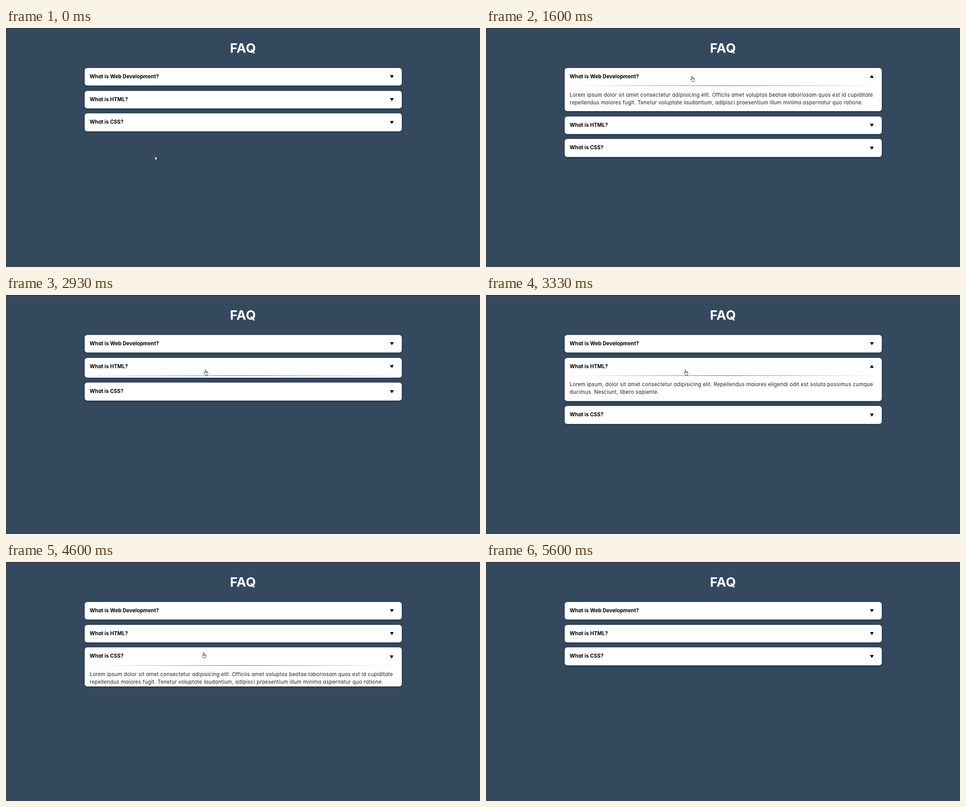
Write an HTML page that moves like this. It is 1054 px wide and 532 px high and loops after 6.34 s.

```html
<!DOCTYPE html>
<html lang="en">
<head>
<meta charset="utf-8">
<title>FAQ</title>
<style>
html, body { margin: 0; width: 100%; height: 100%; overflow: hidden; }
body {
  position: relative;
  background: #34495e;
  font: 400 11.28px/17px Inter, "Open Sans", sans-serif;
  font-feature-settings: "cv11";
  color: #1c1c1c;
}
body::before {
  content: "";
  position: absolute;
  inset: 0 0 auto;
  height: 1px;
  background: #1e2832;
}
h1 {
  position: absolute;
  top: 24.5px;
  left: 0;
  width: 1054px;
  margin: 0;
  font-size: 28.8px;
  font-weight: 700;
  line-height: 40px;
  letter-spacing: .4px;
  text-align: center;
  color: #fff;
}
.list { position: absolute; left: 175px; top: 88.8px; width: 705px; }
.item {
  position: relative;
  height: 39.5px;
  margin-bottom: 11.3px;
  overflow: hidden;
  border-radius: 5.6px;
  background: #fff;
  box-shadow: 0 1.4px 4px rgba(0, 0, 0, .3);
}
h2 {
  margin: 0;
  padding-left: 11px;
  font-size: 11.28px;
  font-weight: 700;
  line-height: 39.5px;
  letter-spacing: .1px;
  color: #000;
}
.mark { position: absolute; left: 677.4px; top: 13.6px; width: 12px; height: 12px; }
p {
  position: relative;
  margin: 0;
  padding: 12.4px 11px;
  letter-spacing: .33px;
  white-space: nowrap;
}
p::before {
  content: "";
  position: absolute;
  inset: 0 0 auto;
  height: 1px;
  background: linear-gradient(90deg, transparent, #34495e, transparent);
  opacity: .85;
}
#cursor { position: absolute; left: 0; top: 0; width: 16px; height: 18px; overflow: visible; }
#cursor path { fill: #fff; stroke: #111; stroke-width: .8; stroke-linejoin: round; }
</style>
</head>
<body>
<h1>FAQ</h1>
<div class="list"></div>
<svg id="cursor">
  <path id="arrow" d="M0 0V9.2L2.1 7.3 3.5 10.4 5 9.8 3.6 6.7H6.5Z"/>
  <path id="hand" d="M-.9 7.6V.9a.9.9 0 0 1 1.8 0V4.6q.9-.8 1.6.1 .9-.6 1.5.3 1.1-.3 1.3.8V8.6q0 2-1 3.6H.3Q-.5 10.6-3 8-3.7 6.8-2.9 6.5-1.9 6.3-.9 7.6ZM.9 4.6V6.6M2.5 4.8V6.6M4 5.1V6.6"/>
</svg>
<script>
const LOOP = 6340, STEP = 1000 / 15;
const HEAD = 39.5, BODY = 57, GAP = 11.3, TOP = 88.8;
const SLIDE = 300, SPIN = 400;

const long = "Lorem ipsum dolor sit amet consectetur adipisicing elit. Officiis amet voluptas beatae laboriosam quos est id cupiditate<br>" +
  "repellendus maiores fugit. Tenetur voluptate laudantium, adipisci praesentium illum minima aspernatur quo ratione.";
const short = "Lorem ipsum, dolor sit amet consectetur adipisicing elit. Repellendus maiores eligendi odit est soluta possimus cumque<br>" +
  "ducimus. Nesciunt, libero sapiente.";

const items = [
  { title: "What is Web Development?", text: long, open: 1263, close: 2138 },
  { title: "What is HTML?", text: short, open: 2905, close: 3601, spinBack: 300 },
  { title: "What is CSS?", text: long, open: 4440, close: 5162 }
];

// Pointer stops: time, x, y
const stops = [
  [267, 331, 285], [930, 457, 96.4], [1130, 458, 107.4],
  [2200, 458, 107.4], [2333, 458, 110.4], [2600, 443.5, 166.4],
  [3667, 443.5, 166.4], [3867, 442, 171.4], [4200, 440, 197.4],
  [4467, 440, 197.4], [4733, 439, 205.4], [5200, 439, 205.4], [5600, 5, 486]
];

const clamp = v => Math.min(1, Math.max(0, v));
const smooth = v => v * v * (3 - 2 * v);
const bez = (a, b, s) => 3 * a * s * (1 - s) ** 2 + 3 * b * s * s * (1 - s) + s ** 3;

// CSS "ease"
function ease(v) {
  if (v <= 0 || v >= 1) return clamp(v);
  let lo = 0, hi = 1;
  for (let i = 0; i < 24; i++) {
    const mid = (lo + hi) / 2;
    if (bez(.25, .25, mid) < v) lo = mid; else hi = mid;
  }
  return bez(.1, 1, lo);
}

const openness = (it, t, inTime, outTime) =>
  ease((t - it.open) / inTime) - ease((t - it.close) / outTime);

function pointer(t) {
  const i = stops.findIndex(s => s[0] > t);
  if (i < 0) return null;
  if (i === 0) return stops[0].slice(1);
  const [t0, x0, y0] = stops[i - 1], [t1, x1, y1] = stops[i];
  const k = smooth((t - t0) / (t1 - t0));
  return [x0 + (x1 - x0) * k, y0 + (y1 - y0) * k];
}

const list = document.querySelector(".list");
for (const it of items) {
  it.el = document.createElement("div");
  it.el.className = "item";
  it.el.innerHTML = `<h2>${it.title}</h2>
    <svg class="mark" viewBox="-6 -6 12 12"><path d="M-4.3-3H4.3L0 3.7Z"/></svg>
    <p>${it.text}</p>`;
  it.mark = it.el.querySelector(".mark path");
  list.append(it.el);
}

const cursor = document.getElementById("cursor");
const arrow = document.getElementById("arrow");
const hand = document.getElementById("hand");

function draw(t) {
  const pos = pointer(t);
  let top = TOP, over = false;
  for (const it of items) {
    const height = HEAD + BODY * openness(it, t, SLIDE, SLIDE);
    const turn = -180 * openness(it, t, SPIN, it.spinBack || SPIN);
    it.el.style.height = height + "px";
    it.mark.setAttribute("transform", `rotate(${turn})`);
    if (pos && pos[1] >= top && pos[1] < top + HEAD && pos[0] > 175) over = true;
    top += height + GAP;
  }
  cursor.style.display = pos ? "" : "none";
  if (!pos) return;
  cursor.style.transform = `translate(${pos[0]}px, ${pos[1]}px)`;
  arrow.style.display = over ? "none" : "";
  hand.style.display = over ? "" : "none";
}

const start = performance.now();
function tick() {
  const t = (performance.now() - start) % LOOP;
  draw(Math.floor((t + 3.4) / STEP) * STEP);
  requestAnimationFrame(tick);
}
tick();
</script>
</body>
</html>
```
